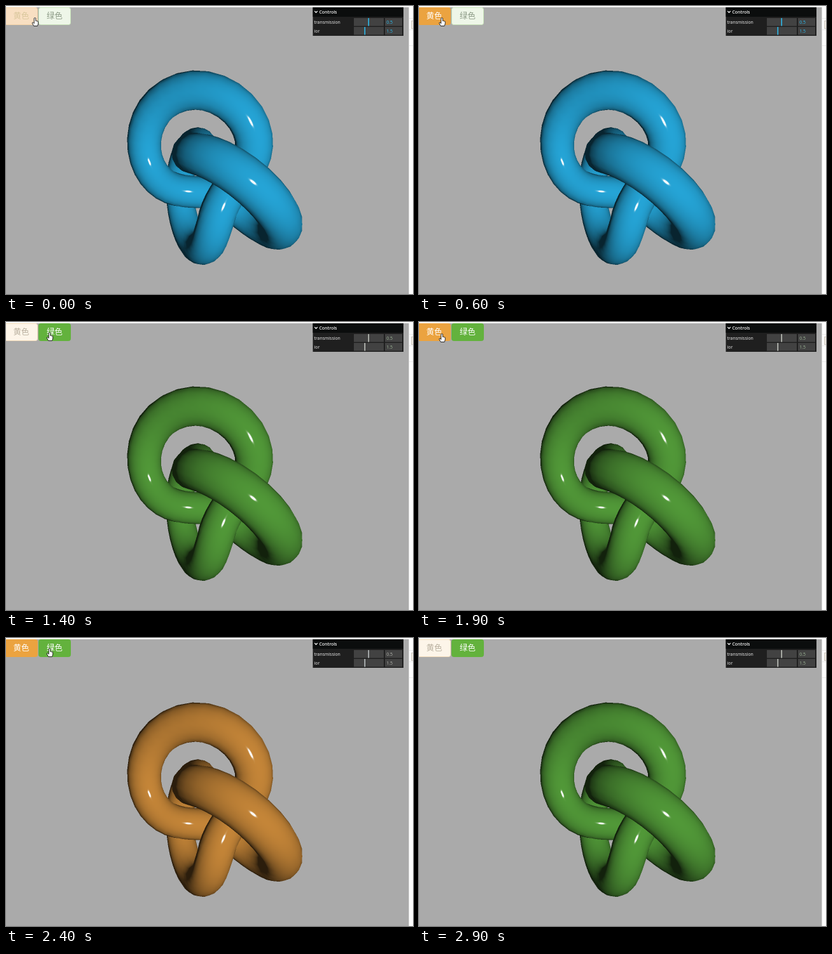
An HTML page with a canvas for the animation above (3000 ms loop, 640x454 px).

```html
<!DOCTYPE html>
<html lang="zh">
<head>
<meta charset="utf-8">
<title>Torus knot</title>
<style>
html, body { margin: 0; width: 640px; height: 454px; overflow: hidden; background: #aaaaaa; }
canvas, svg { position: absolute; left: 0; top: 0; display: block; }
.cn { font: 12.4px "Noto Sans CJK SC", "Noto Sans CJK", "Noto Sans", sans-serif; text-anchor: middle; }
.ui { font: 6.9px "Open Sans", "Noto Sans", sans-serif; }
</style>
</head>
<body>
<canvas id="view" width="640" height="454"></canvas>
<svg width="640" height="454" viewBox="0 0 640 454">
  <path d="M0 0H640V454H633.5V2H0Z" fill="#fdfdfd"/>
  <path d="M634 19.5h6M634 37.5h6M634 62.5h6" stroke="#ececec"/>
  <rect x="637.5" y="23.5" width="6" height="12" fill="#f3eee6" stroke="#cfcac3"/>

  <rect id="yBox" x="-2.5" y="2.5" width="52" height="27" rx="3"/>
  <text id="yText" class="cn" x="24" y="20.3">黄色</text>
  <rect id="gBox" x="51.5" y="2.5" width="50" height="27" rx="3"/>
  <text id="gText" class="cn" x="76.5" y="20.3">绿色</text>

  <rect x="482.5" y="2" width="142.5" height="45" fill="#1f1f1f"/>
  <rect x="482.5" y="2" width="142.5" height="15" fill="#0b0d0d"/>
  <path d="M485.3 8l2.2 2.3L489.7 8" fill="none" stroke="#fff" stroke-width="1.2"/>
  <g class="ui" fill="#f2f2f2">
    <text x="492.5" y="11.8" font-weight="600">Controls</text>
    <text x="484.5" y="28">transmission</text>
    <text x="484.5" y="42">ior</text>
  </g>
  <path d="M547 19h47v12.500h-47zM596 19h27v12.500h-27zM547 33h47v12.500h-47zM596 33h27v12.500h-27z" fill="#424242"/>
  <path id="marks" d="M570.2 19v12.500M564.3 33v12.500" stroke-width="1.400"/>
  <g id="values" class="ui">
    <text x="598.3" y="28">0.5</text>
    <text x="598.3" y="42">1.5</text>
  </g>

  <path id="hand" d="M-1.300 .7Q0 -.6 1.300 .7V5L2.400 4.700 3.300 5.500 4.500 5.300 5.200 6.300V9.500L4 13H-1.800L-4.300 8.600Q-4.300 7.200 -3 7.400L-1.300 9Z"
    fill="#fff" stroke="#111" stroke-width=".9" stroke-linejoin="round"/>
</svg>
<script>
const $ = id => document.getElementById(id);
const LOOP = 3000, STEP = 100;
const W = 640, H = 454, SS = 2;

const add = (a, b, k = 1) => a.map((v, i) => v + k * b[i]);
const dot = (a, b) => a[0] * b[0] + a[1] * b[1] + a[2] * b[2];
const cross = (a, b) => [a[1] * b[2] - a[2] * b[1], a[2] * b[0] - a[0] * b[2], a[0] * b[1] - a[1] * b[0]];
const unit = a => a.map(v => v / Math.hypot(...a));

// The camera looks at the origin from (3, 3, 3); all points are in its axes
const DIST = Math.sqrt(27), FOCAL = 471, CX = 316.5, CY = 271.7;
const EYE = [0, 0, DIST], LIGHT = [1.5, -.2, DIST];
const TUBE = .3, ALONG = 100, AROUND = 16;

function knot(u) {
  const r = (2 + Math.cos(1.5 * u)) / 2;
  const x = r * Math.cos(u), y = r * Math.sin(u), z = Math.sin(1.5 * u) / 2;
  return [(x - z) / Math.SQRT2, (2 * y - x - z) / Math.sqrt(6), (x + y + z) / Math.sqrt(3)];
}

function vertex(i, j) {
  const u = i / ALONG * 4 * Math.PI, v = j / AROUND * 2 * Math.PI;
  const p = knot(u), q = knot(u + .01), dir = add(q, p, -1);
  const side = unit(cross(dir, add(p, q))), out = unit(cross(side, dir));
  const n = add(out.map(c => -c * Math.cos(v)), side, Math.sin(v));
  const pos = add(p, n, TUBE), w = 1 / (DIST - pos[2]);
  return { pos, n, w, x: SS * (CX + FOCAL * pos[0] * w), y: SS * (CY - FOCAL * pos[1] * w) };
}

// Per pixel: nearness, diffuse level, gloss
const size = W * SS * H * SS;
const near = new Float32Array(size), level = new Float32Array(size), gloss = new Float32Array(size);

function shade(at, pos, normal) {
  const n = unit(normal), l = unit(add(LIGHT, pos, -1)), e = unit(add(EYE, pos, -1));
  level[at] = Math.pow(.035 + .965 * Math.max(0, dot(n, l)), 1 / 2.2);
  gloss[at] = Math.min(1, 2.5 * Math.pow(Math.max(0, dot(n, unit(add(l, e)))), 1200));
}

function triangle(a, b, c) {
  const area = (b.x - a.x) * (c.y - a.y) - (b.y - a.y) * (c.x - a.x);
  if (!area) return;
  const xs = [a.x, b.x, c.x], ys = [a.y, b.y, c.y];
  const mix = (key, s, t) => a[key].map((v, i) => v * (1 - s - t) + b[key][i] * s + c[key][i] * t);
  for (let y = Math.ceil(Math.min(...ys)); y <= Math.max(...ys); y++) {
    for (let x = Math.ceil(Math.min(...xs)); x <= Math.max(...xs); x++) {
      const s = ((x - a.x) * (c.y - a.y) - (y - a.y) * (c.x - a.x)) / area;
      const t = ((b.x - a.x) * (y - a.y) - (b.y - a.y) * (x - a.x)) / area;
      if (s < 0 || t < 0 || s + t > 1) continue;
      const w = a.w * (1 - s - t) + b.w * s + c.w * t, at = y * W * SS + x;
      if (w <= near[at]) continue;
      near[at] = w;
      shade(at, mix("pos", s, t), mix("n", s, t));
    }
  }
}

for (let i = 0; i < ALONG; i++) {
  for (let j = 0; j < AROUND; j++) {
    const a = vertex(i, j), b = vertex(i + 1, j), c = vertex(i + 1, j + 1), d = vertex(i, j + 1);
    triangle(a, b, d);
    triangle(b, c, d);
  }
}

function paint(tint) {
  const c = document.createElement("canvas");
  c.width = W * SS;
  c.height = H * SS;
  const g = c.getContext("2d"), img = g.createImageData(c.width, c.height);
  for (let i = 0; i < size; i++) {
    if (!near[i]) continue;
    tint.forEach((v, k) => {
      const base = v * level[i];
      img.data[4 * i + k] = base + (255 - base) * gloss[i];
    });
    img.data[4 * i + 3] = 255;
  }
  g.putImageData(img, 0, 0);
  return c;
}

const skins = {
  start: { image: paint([37, 164, 214]), mark: "#2cc9ff", value: "#2cbdf0" },
  y: { image: paint([196, 133, 56]), mark: "#c9cfd0", value: "#b4b5ae" },
  g: { image: paint([81, 152, 56]), mark: "#d0d4cc", value: "#9db596" }
};

const looks = {
  yOff: ["#fdf5e9", "#f3dcb8", "#b9b09f"],
  yMid: ["#f8dfc2", "#f2d2a6", "#d9c79c"],
  yOn: ["#eba340", "#eba340", "#ffffff"],
  gOff: ["#eef6e8", "#c6e2b6", "#8c9a86"],
  gOn: ["#63b23d", "#63b23d", "#ffffff"]
};
function button(key, look) {
  const [fill, stroke, ink] = looks[key + look];
  $(key + "Box").setAttribute("fill", fill);
  $(key + "Box").setAttribute("stroke", stroke);
  $(key + "Text").setAttribute("fill", ink);
}

const clicks = [[0, "start"], [700, "y"], [1200, "g"], [2000, "y"], [2600, "g"]];
const view = $("view").getContext("2d");
let shown = "";

function ease(t, from, length) {
  const s = Math.min(1, Math.max(0, (t - from) / length));
  return s * s * (3 - 2 * s);
}

function draw(t) {
  const pressed = clicks.filter(c => c[0] <= t).pop()[1];
  if (pressed !== shown) {
    shown = pressed;
    view.fillStyle = "#aaaaaa";
    view.fillRect(0, 0, W, H);
    view.drawImage(skins[pressed].image, 0, 0, W, H);
    $("marks").setAttribute("stroke", skins[pressed].mark);
    $("values").setAttribute("fill", skins[pressed].value);
  }
  // 0 over the yellow button, 1 over the green one
  const swing = ease(t, 700, 250) - ease(t, 1500, 350) + ease(t, 2050, 300);
  const x = 45.5 - 9.5 * ease(t, 0, 300) + 32.5 * swing, y = 18.5 - 2 * swing;
  const hover = x < 50 ? "y" : "g";
  const lit = key => pressed === key || hover === key;
  button("y", t < 100 ? "Mid" : lit("y") ? "On" : "Off");
  button("g", lit("g") ? "On" : "Off");
  $("hand").setAttribute("transform", `translate(${x} ${y})`);
  $("hand").setAttribute("visibility", t < 2800 ? "visible" : "hidden");
}

const start = performance.now();
function tick() {
  const t = (performance.now() - start) % LOOP;
  draw(Math.floor(t / STEP) * STEP);
  requestAnimationFrame(tick);
}
tick();
</script>
</body>
</html>
```
